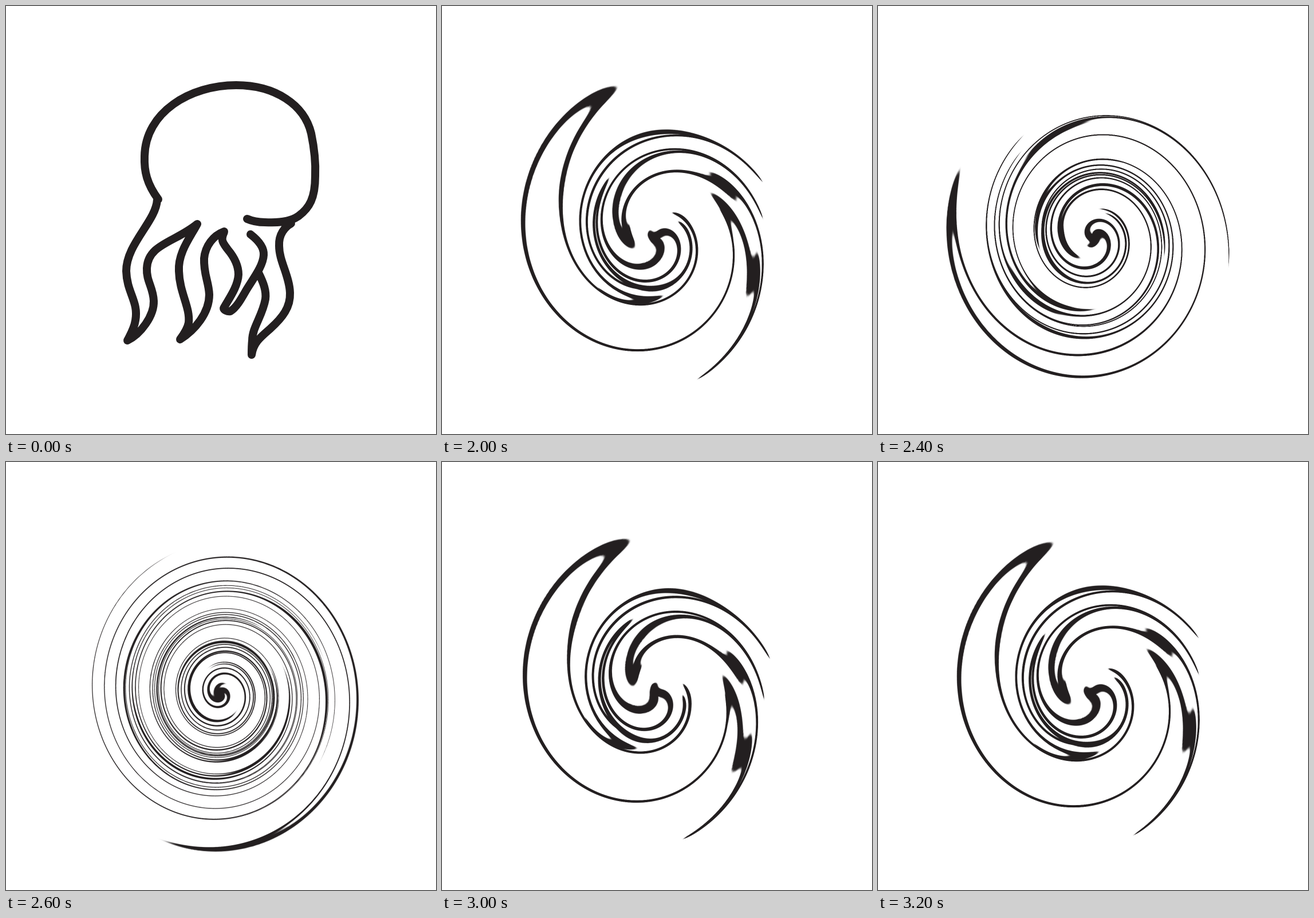
Recreate the animation shown at these times as an HTML page with a canvas. Size 751 by 746 pixels, loop 3400 ms.

```html
<!DOCTYPE html>
<html lang="en">
<head>
<meta charset="utf-8">
<title>Jellyfish twirl</title>
<style>
html, body { margin: 0; width: 100%; height: 100%; overflow: hidden; background: #fff; }
canvas { display: block; }
</style>
</head>
<body>
<canvas width="751" height="746"></canvas>
<script>
const W = 751, H = 746;
const CX = 375, CY = 402.5, ASPECT = 806 / 751, RADIUS = 372, REACH = 270;
const ctx = document.querySelector('canvas').getContext('2d', { willReadFrequently: true });

const outline = [
  // head
  'M266 337 C246 310 241 288 242 262 C243 185 322 138 402 138 C470 138 521 172 533 222',
  'C538 246 541 275 540 296 C540 335 530 352 511 366 C494 378 470 378 452 377 C440 377 430 375 421 371',
  // left tentacles
  'M264 338 C262 375 210 415 210 462 C211 500 232 515 226 548 C224 562 217 573 212 583',
  'C235 572 259 540 258 514 C257 490 245 480 246 457 C248 415 295 412 334 380',
  'C322 403 300 430 302 462 C303 500 322 525 319 552 C317 563 310 573 304 581',
  'C330 565 355 535 355 503 C354 480 345 468 346 440 C348 418 362 400 381 393',
  // short tentacle
  'M381 394 C374 408 379 413 387 424 C398 437 406 452 406 468 C405 490 388 512 380 527',
  'C381 530 386 533 392 532 C402 526 410 512 418 498 C428 480 449 455 450 434 C451 420 440 408 427 398',
  // right tentacle
  'M441 465 C450 483 455 497 453 511 C448 540 430 560 430 583 C429 592 429 600 429 608',
  'C432 586 446 576 462 562 C483 543 497 525 496 500 C495 470 477 445 477 418 C476 398 487 385 498 379'
].join(' ');

function drawJellyfish() {
  ctx.strokeStyle = 'rgb(35,31,32)';
  ctx.lineWidth = 14;
  ctx.lineCap = ctx.lineJoin = 'round';
  ctx.stroke(new Path2D(outline));
  const { data } = ctx.getImageData(0, 0, W, H);
  return Float32Array.from({ length: W * H }, (_, i) => data[i * 4 + 3]);
}

function sample(ink, x, y) {
  const x0 = Math.floor(x), y0 = Math.floor(y);
  if (x0 < 0 || y0 < 0 || x0 >= W - 1 || y0 >= H - 1) return 0;
  const u = x - x0, v = y - y0, i = y0 * W + x0;
  return (ink[i] * (1 - u) + ink[i + 1] * u) * (1 - v) +
    (ink[i + W] * (1 - u) + ink[i + W + 1] * u) * v;
}

// Elliptical twirl: the turn falls off with the square of the distance to the rim.
function twirl(ink, degrees) {
  const out = new Float32Array(W * H), turn = degrees * Math.PI / 180;
  const at = (x, y) => {
    const dx = x - CX, dy = (y - CY) / ASPECT, r = Math.hypot(dx, dy);
    if (r > REACH) return 0;
    const a = turn * (1 - r / RADIUS) ** 2, c = Math.cos(a), s = Math.sin(a);
    return sample(ink, CX + dx * c - dy * s, CY + (dx * s + dy * c) * ASPECT);
  };
  for (let y = 100; y < 700; y++)
    for (let x = 100; x < 650; x++)
      out[y * W + x] = (at(x - .25, y - .25) + at(x + .25, y - .25) +
        at(x - .25, y + .25) + at(x + .25, y + .25)) / 4;
  return out;
}

function toImage(ink) {
  const img = new ImageData(W, H);
  ink.forEach((a, i) => img.data.set([35, 31, 32, a], i * 4));
  return img;
}

const still = drawJellyfish();
const wound = twirl(still, 999);
const poses = [still, twirl(still, 500), twirl(still, 450), wound, twirl(wound, 999)].map(toImage);
const order = [0, 1, 2, 3, 4, 3, 2, 1];
let shown = -1;

function tick() {
  const t = performance.now() % 3400;
  const pose = order[t < 2000 ? 0 : 1 + Math.floor((t - 2000) / 200)];
  if (pose !== shown) ctx.putImageData(poses[shown = pose], 0, 0);
  requestAnimationFrame(tick);
}
tick();
</script>
</body>
</html>
```
